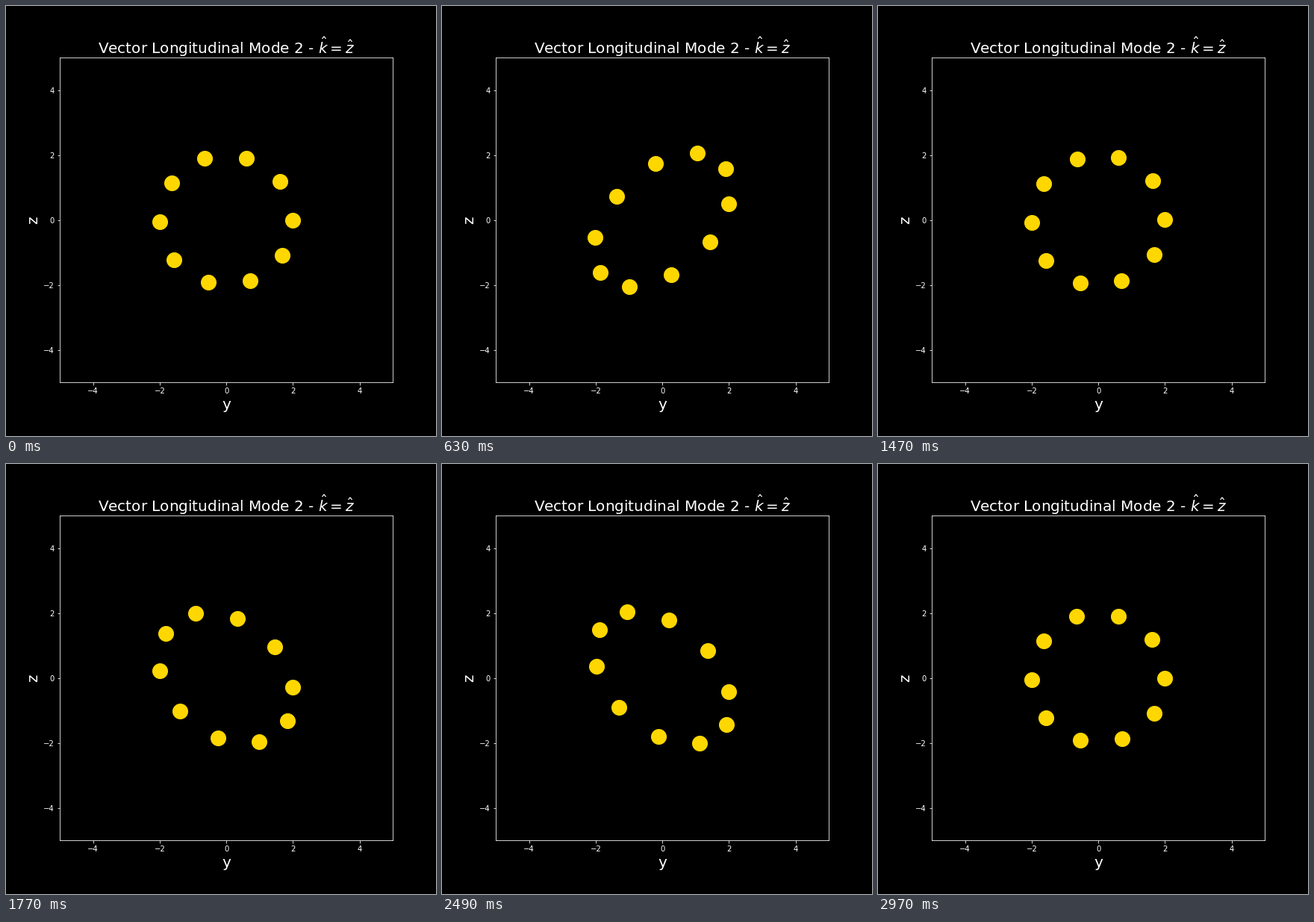
A matplotlib script for the animation above (3000 ms loop, 576 px wide and 576 px high).

```python
import numpy as np
import matplotlib.pyplot as plt
from matplotlib.animation import FuncAnimation

FRAMES = 100
RADIUS, STRAIN = 2, 0.25

plt.style.use("dark_background")
plt.rcParams["font.family"] = "DejaVu Sans"

fig, ax = plt.subplots(figsize=(8, 8), dpi=72)
fig.subplots_adjust(left=0.125, right=0.9, bottom=0.125, top=0.88)
ax.set(xlim=(-5, 5), ylim=(-5, 5))
ax.set_title(r"Vector Longitudinal Mode 2 - $\hat{k} = \hat{z}$", fontsize=20)
ax.set_xlabel("y", fontsize=20)
ax.set_ylabel("z", fontsize=20)

# Every tenth point of a finely sampled ring
theta = np.linspace(0, 2 * np.pi, 100)[::10]
y0, z0 = RADIUS * np.cos(theta), RADIUS * np.sin(theta)
phase = np.linspace(0, 2 * np.pi, FRAMES)

dots, = ax.plot(y0, z0, "o", color="gold", markersize=20)


def update(i):
    shear = STRAIN * np.sin(phase[i])
    dots.set_data(y0 + shear * z0, z0 + shear * y0)
    return dots,


anim = FuncAnimation(fig, update, frames=FRAMES, interval=30,
                     repeat=True, repeat_delay=0)
plt.show()
```
